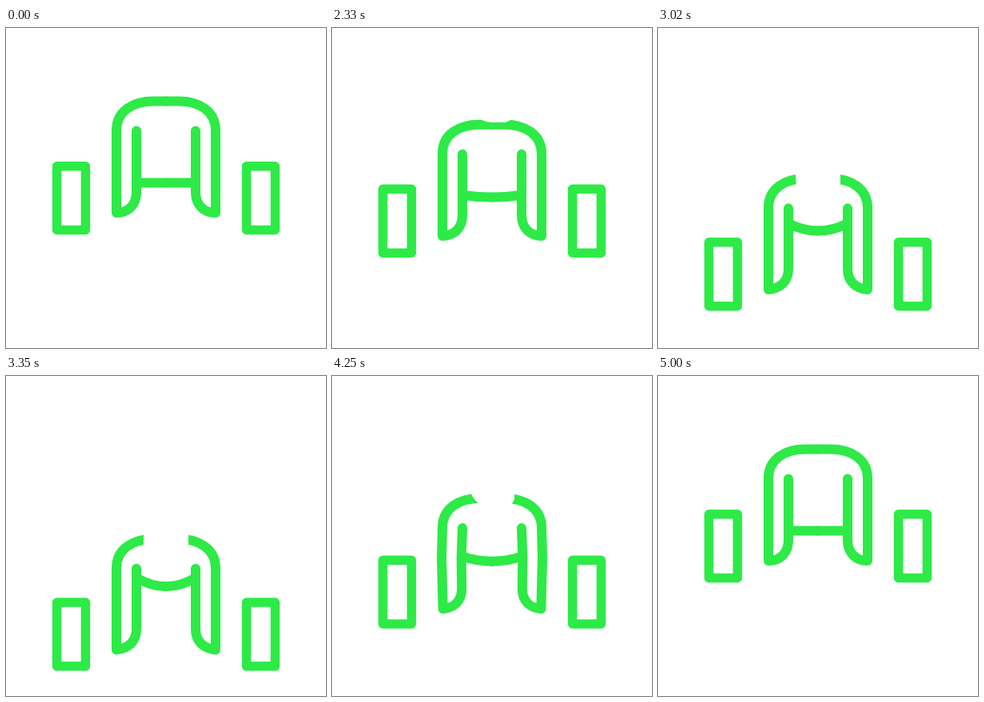
These frames come from a looping animation (400 px wide and 400 px high, 5.03 s). An HTML page:

```html
<!DOCTYPE html>
<html>
<head>
<meta charset="utf-8">
<title>Deadlift</title>
<style>
html, body { margin: 0; height: 100%; overflow: hidden; background: #fff; }
svg { display: block; width: 100vw; height: 100vh; }
#half { fill: none; stroke: #2dea47; stroke-width: 12; stroke-linecap: round; stroke-linejoin: round; }
#plate { stroke-width: 11.5; }
</style>
</head>
<body>
<svg viewBox="0 0 400 400">
  <g id="half">
    <path id="body"/>
    <rect id="plate" x="63.6" width="35.8" height="79.8"/>
  </g>
  <use href="#half" transform="matrix(-1 0 0 1 400 0)"/>
  <path id="head" fill="#fff" d="M172 -80H228V-14A14 14 0 0 1 214 0H200A28 28 0 0 1 172 -28Z"/>
</svg>
<script>
const LOOP = 5030, DOWN = 2030, UP = 3515;
const $ = id => document.getElementById(id);
const clamp = x => Math.min(1, Math.max(0, x));

const easeDown = u => 1 - (1 - u) ** 2 * (1 + 0.95 * u);
const easeUp = u => u < 0.5 ? 16 * u ** 5 : 1 - 16 * (1 - u) ** 5;

function draw(t) {
  // depth: 0 standing, 1 lowest; bend: elbows flaring at the end of the lift
  const depth = t < UP ? easeDown(clamp((t - DOWN) / 1400))
                       : 1 - easeUp(clamp((t - UP) / 1500));
  const off = clamp(Math.abs(t - 4520) / 440);
  const bend = Math.cos(off * Math.PI / 2) ** 2;

  const drop = 113 * depth;
  const hand = 231 + 112 * depth - 3 * bend;
  const elbow = 166 + drop;
  const waist = 193.5 + 70 * depth;

  $('body').setAttribute('d', `
    M200 ${91.5 + drop} H184
    C160 ${91.5 + drop} 138 ${103 + drop} 138 ${128 + drop}
    L${138 - 3 * bend} ${elbow} L${138 + 2 * bend} ${hand}
    C${153} ${hand - 2 * depth} ${163 - 2 * bend} ${hand - 10} ${163 - 2.5 * bend} ${hand - 26}
    L${163 - 4 * bend} ${elbow} L163 ${128.5 + drop}
    M163 ${193.5 + 59 * depth} Q181 ${waist} 200 ${waist}`);
  $('plate').setAttribute('y', 172.7 + 111 * depth - 9 * bend);
  $('head').setAttribute('transform', `translate(0 ${76 + 163 * depth})`);
}

const start = performance.now();
function tick() {
  draw((performance.now() - start) % LOOP);
  requestAnimationFrame(tick);
}
tick();
</script>
</body>
</html>
```
